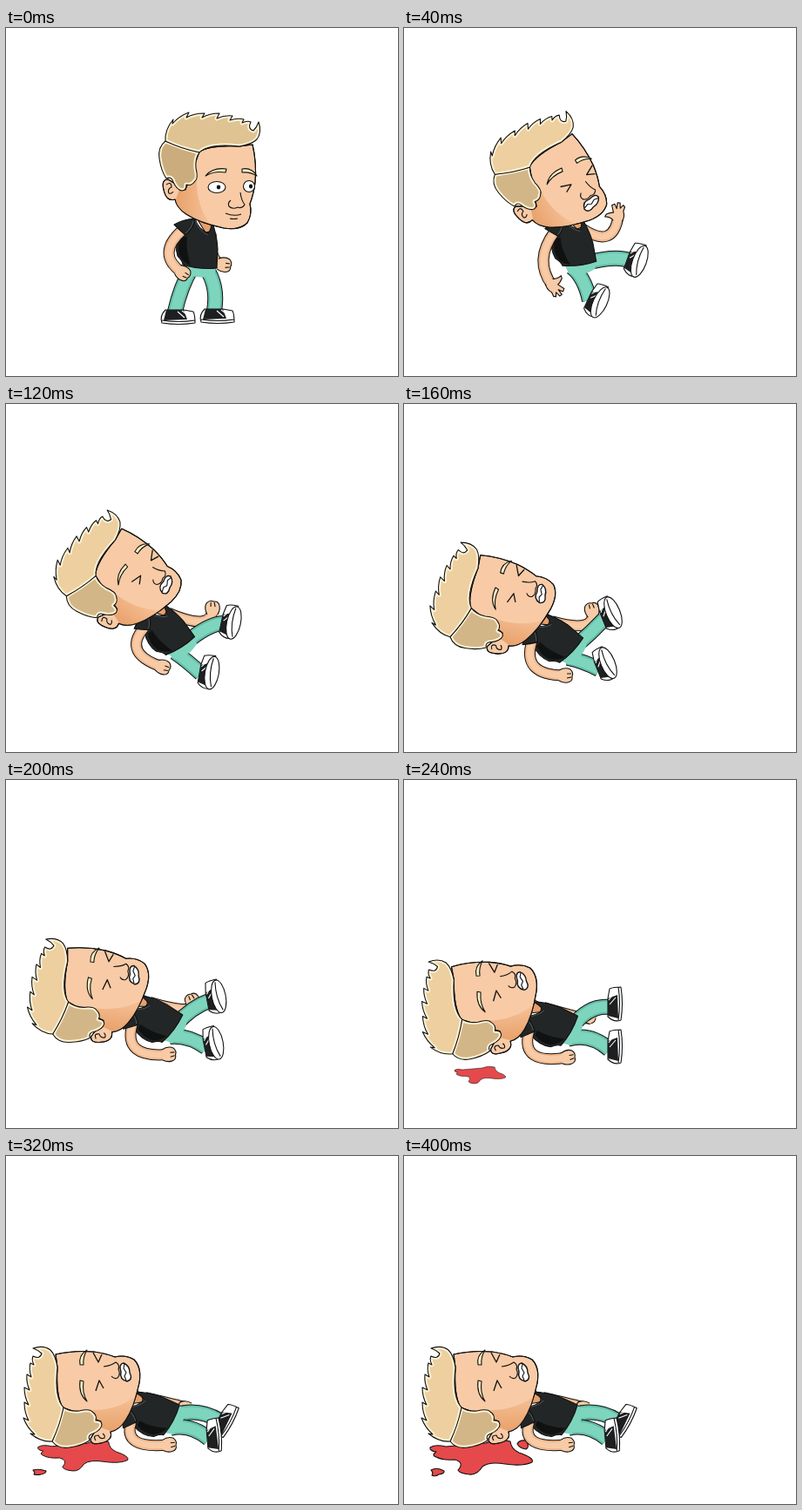
Animation, 450 px wide and 400 px high, one loop 0.56 s. Source, as an HTML page with a canvas:

```html
<!DOCTYPE html>
<html>
<head>
<meta charset="utf-8">
<style>
html, body { margin: 0; width: 100%; height: 100%; overflow: hidden; background: #fff; }
canvas { display: block; }
</style>
</head>
<body>
<canvas id="stage" width="450" height="400"></canvas>
<script>
const ctx = document.getElementById('stage').getContext('2d');
const STEP = 40, LOOP = 560;
const SKIN = '#f8cba6', PANTS = '#7ed5be', SHIRT = '#232626', INK = '#111', CREAM = '#fff3d6';

// Pose keys: x, y, degrees for rigid parts; mid x, y, end x, y (, degrees) for limbs.
const TIMES = [0, 40, 120, 160, 240, 320];
const TRACKS = {
  head: [[234, 165, 0], [166, 173, -30], [128, 201, -53], [102, 230, -72], [88, 262, -93], [88, 277, -90]],
  torso: [[220, 248, 0], [193, 246, -13], [182, 259, -38], [170, 269, -52], [165, 280, -66], [165, 296, -68]],
  nearArm: [[187, 258, 202, 281], [160, 266, 170, 296], [151, 283, 179, 302], [150, 302, 184, 312], [149, 316, 187, 319], [149, 328, 186, 332]],
  farArm: [[238, 262, 249, 272], [233, 239, 246, 216], [224, 250, 237, 236], [207, 254, 216, 238], [204, 273, 213, 272], [199, 287, 207, 290]],
  nearLeg: [[202, 299, 194, 326, 0], [205, 290, 213, 313, -65], [208, 296, 224, 310, -80], [206, 297, 224, 305, -112], [213, 297, 236, 310, -90], [211, 313, 233, 325, -95]],
  farLeg: [[239, 298, 239, 325, 0], [238, 265, 258, 267, -70], [230, 258, 249, 252, -78], [214, 263, 230, 247, -112], [214, 265, 236, 261, -90], [220, 295, 245, 304, -62]]
};

function pose(name, t) {
  const keys = TRACKS[name];
  let i = 0;
  while (i < TIMES.length - 1 && t >= TIMES[i + 1]) i++;
  if (i === TIMES.length - 1) return keys[i];
  const k = (t - TIMES[i]) / (TIMES[i + 1] - TIMES[i]);
  return keys[i].map((v, j) => v + (keys[i + 1][j] - v) * k);
}

const rad = deg => deg * Math.PI / 180;

function place([x, y, deg], ox, oy, draw) {
  ctx.save();
  ctx.translate(x, y);
  ctx.rotate(rad(deg));
  ctx.translate(-ox, -oy);
  draw();
  ctx.restore();
}

function shape(d, fill, line = INK, width = 1.1) {
  const p = new Path2D(d);
  if (fill) { ctx.fillStyle = fill; ctx.fill(p); }
  if (line) { ctx.strokeStyle = line; ctx.lineWidth = width; ctx.stroke(p); }
}

function rimmed(d, fill) {
  ctx.save();
  ctx.clip(new Path2D(d));
  shape(d, fill, CREAM, 5);
  ctx.restore();
  shape(d);
}

function oval(x, y, rx, ry, fill) {
  ctx.beginPath();
  ctx.ellipse(x, y, rx, ry, 0, 0, 7);
  ctx.fillStyle = fill;
  ctx.fill();
  ctx.strokeStyle = INK;
  ctx.lineWidth = 1.1;
  ctx.stroke();
}

// A bent tube from a through the mid point to the end; returns the end direction.
function tube([ax, ay], [mx, my, bx, by], width, color, shade) {
  const cx = 2 * mx - (ax + bx) / 2, cy = 2 * my - (ay + by) / 2;
  const path = new Path2D(`M${ax} ${ay}Q${cx} ${cy} ${bx} ${by}`);
  for (const [w, c] of [[width + 2, INK], [width, shade], [width - 4, color]]) {
    ctx.lineWidth = w;
    ctx.strokeStyle = c;
    ctx.stroke(path);
  }
  return Math.atan2(by - cy, bx - cx) * 180 / Math.PI;
}

function arm(from, limb, open) {
  const deg = tube(from, limb, 11, SKIN, '#f0b68b');
  place([limb[2], limb[3], deg], 0, 0, () => {
    if (open) {
      shape('M-6-5Q-2-9-3-15L0-14Q3-9 3-6L11-9L13-6L8-3L15-3L15 0L9 1L13 4L11 6L6 5Q0 8-6 5', SKIN);
    } else {
      shape('M-6-6Q1-10 7-7Q11-3 9 1Q10 7 4 8Q-1 9-6 6', SKIN);
      shape('M3-2L8-2M3 3L8 2');
    }
  });
}

function leg(from, limb, soleUp) {
  tube(from, limb, 16, PANTS, '#62bda6');
  place(limb.slice(2), 0, 0, () => {
    shape('M-11-2L10-2L21 0Q23 4 23 13Q4 16-15 13Q-18 5-11-2Z', '#fff');
    shape('M-10-2L10-2L14 9L-13 10Z', '#1d1f20', null);
    shape('M3 0L11 7M8-1L16 5', null, '#fff');
    if (soleUp) {
      oval(3, 12, 19, 8, '#fff');
      shape('M-13 14Q2 8 20 11');
    } else {
      shape('M-15 10Q4 13 23 10');
    }
  });
}

function drawTorso() {
  shape('M205 268L242 272L239 284Q222 290 208 282Z', PANTS, null);
  shape('M216 214L239 216L238 233L229 235Z', '#e8a06a');
  shape('M203 223L217 219Q221 232 232 236Q236 232 236 222Q242 236 243 254L242 276Q222 278 203 272Q203 268 197 262Q193 250 200 236Z', SHIRT);
  shape('M202 240Q196 250 199 261Q204 270 212 273Q206 255 208 240Z', '#101212', null);
  shape('M217 221Q222 234 232 238', null, '#4b5050', 1);
}

function drawSleeve() {
  shape('M193 226Q203 220 217 219Q216 230 206 238Q199 232 193 226Z', SHIRT);
  shape('M215 222Q213 231 206 236', null, '#555a5a', 1);
}

function drawHead(hurt) {
  const face = 'M222 142Q236 134 268 136L283 134Q288 155 286 178Q284 192 280 202Q283 214 277 224Q268 233 250 230Q222 224 207 214Q196 207 194 197Q184 200 181 186Q178 174 186 174L206 186Z';
  shape(face, SKIN);
  ctx.save();
  ctx.clip(new Path2D(face));
  const shade = ctx.createLinearGradient(196, 0, 234, 0);
  shade.addColorStop(0, '#e9a26c');
  shade.addColorStop(1, '#f5c197');
  shape('M204 170L219 170Q217 205 238 230L190 230L195 197Z', shade, null);
  ctx.restore();
  shape(face);
  shape('M184 180Q190 176 190 183Q185 185 187 190Q190 191 192 188');
  rimmed('M183 130Q174 137 176 150Q178 164 184 173Q190 170 192 177Q196 186 202 187Q207 187 207 180Q213 182 217 176Q221 173 218 161Q217 150 222 143Q202 138 183 130Z', hurt ? '#d3b688' : '#cbad7d');
  rimmed('M183 130Q182 117 192 105L191 110Q199 101 210 97L207 103Q216 98 228 98L225 103Q234 98 245 98L242 104Q251 100 260 101L257 106Q266 103 273 105L271 109Q277 106 281 108Q277 116 284 118Q288 114 290 108Q294 120 288 128Q282 134 268 136Q250 134 238 136Q227 138 222 143Q202 139 183 130Z', hurt ? '#edcfa0' : '#dfc393');

  shape('M229 170Q237 160 253 162L252 166Q239 164 229 170Z', '#fbefc4');
  shape('M271 162Q282 160 288 170Q280 165 271 166Z', '#fbefc4');
  shape('M269 189Q270 198 274 203Q271 208 266 206Q260 209 256 205Q254 201 258 198');
  if (hurt) {
    shape('M241 180L253 184L244 189M285 177L274 183L283 187', null, INK, 1.3);
    shape('M252 216Q254 207 263 209Q272 206 273 212Q270 219 262 219Q254 223 252 216Z', '#fff', INK, 1.4);
    shape('M253 215L258 213L262 215L267 212L272 213');
  } else {
    oval(242, 183, 10, 6.5, '#fff');
    oval(279, 182, 6.5, 6.5, '#fff');
    oval(244, 183, 1.7, 1.9, INK);
    oval(281, 182, 1.5, 1.9, INK);
    shape('M252 213Q262 217 270 214M257 219Q261 220 266 219');
  }
}

function drawBlood(t) {
  if (t < 240) return;
  const size = t < 320 ? 0.5 + (t - 240) / 80 * 0.38 : Math.min(1, 0.88 + (t - 320) / 80 * 0.12);
  ctx.save();
  ctx.translate(86, 332);
  ctx.scale(size, size);
  ctx.translate(-86, -332);
  shape('M30 335Q36 331 48 334L94 330Q106 324 122 328Q123 337 132 341Q150 347 147 352Q136 357 116 354Q98 351 90 357Q84 367 75 366Q64 365 62 361Q70 352 58 349Q44 350 37 346Q31 344 37 340Q29 339 30 335Z', '#e5494b');
  ctx.restore();
  if (t >= 320) {
    const k = Math.min(1, (t - 320) / 80);
    shape(`M31 361Q38 ${359 - 2 * k} 46 362Q${46 + k} 365 40 366Q36 ${367 + 2 * k} 32 ${366 + k}Q34 364 31 361Z`, '#e5494b');
  }
  if (t >= 400) shape('M130 331Q132 326 140 327Q145 334 140 337Q133 336 130 331Z', '#e5494b');
}

function render(t) {
  const torso = pose('torso', t);
  const a = rad(torso[2]), c = Math.cos(a), s = Math.sin(a);
  const joint = (x, y) => [torso[0] + x * c - y * s, torso[1] + x * s + y * c];
  const open = t > 0 && t < 120, soleUp = t > 0 && t < 240;

  ctx.fillStyle = '#fff';
  ctx.fillRect(0, 0, 450, 400);
  ctx.lineJoin = 'round';
  drawBlood(t);
  arm(joint(15, -12), pose('farArm', t), open);
  leg(joint(9, 27), pose('farLeg', t), soleUp);
  leg(joint(-7, 28), pose('nearLeg', t), soleUp);
  place(torso, 220, 248, drawTorso);
  arm(joint(-17, -16), pose('nearArm', t), open);
  place(torso, 220, 248, drawSleeve);
  place(pose('head', t), 234, 165, () => drawHead(t > 0));
}

const start = performance.now();
function tick() {
  const t = (performance.now() - start) % LOOP;
  render(Math.min(400, Math.floor(t / STEP) * STEP));
  requestAnimationFrame(tick);
}
tick();
</script>
</body>
</html>
```
